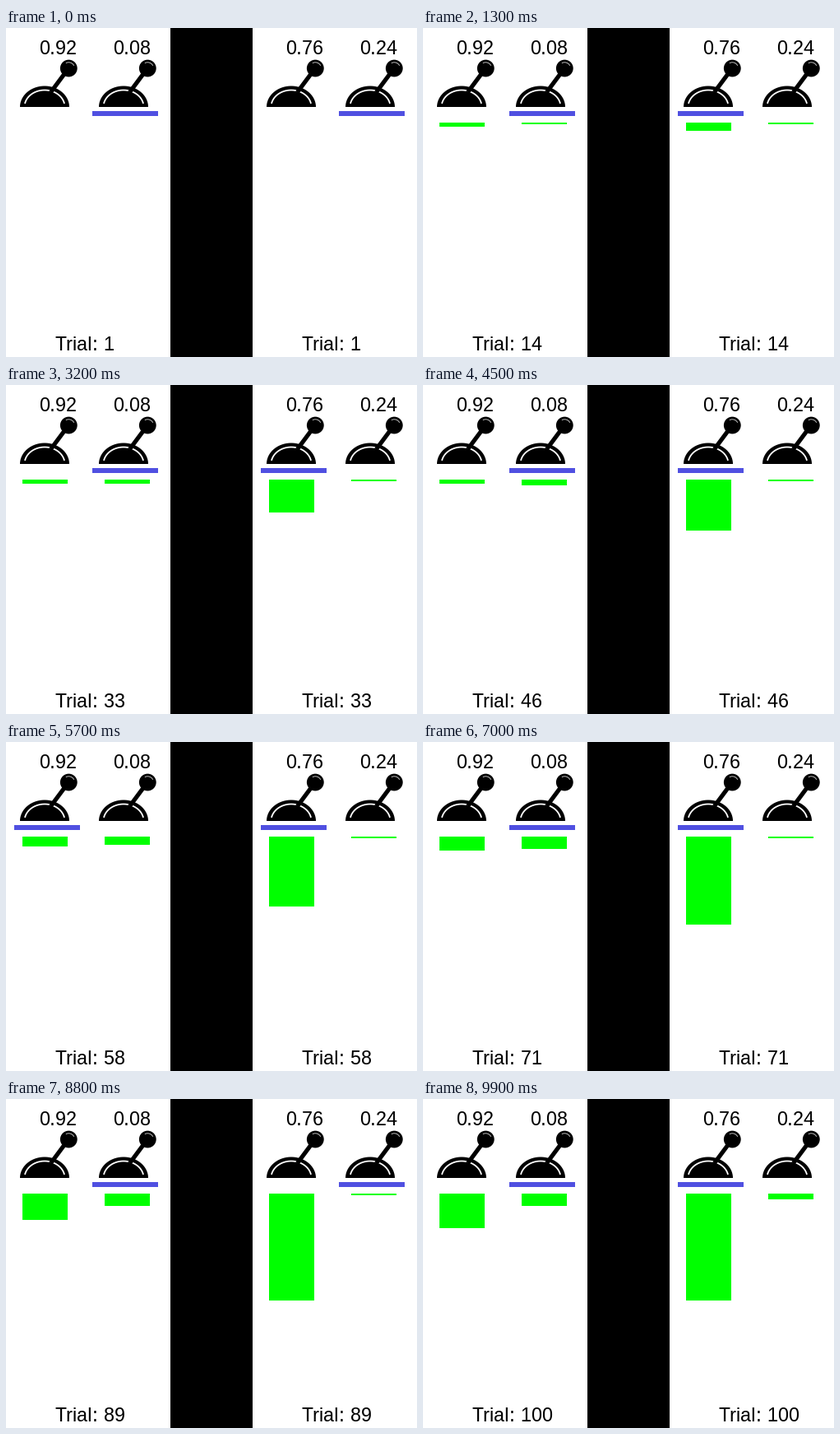
Recreate the animation shown at these times as a matplotlib script. Size 500 px wide and 400 px high, loop 10 s.

```python
import numpy as np
import matplotlib.pyplot as plt
from matplotlib.animation import FuncAnimation
from matplotlib.patches import Circle, Polygon, Rectangle

W, H, DPI = 500, 400, 100
TRIALS = 100
PX = 72 / DPI
BLUE, GREEN = "#5050e1", "#00ff00"
BAR_TOP, WIN_HEIGHT = 115, 2.5

plt.rcParams.update({
    "font.family": "Liberation Sans",
    "font.size": 17.28125,  # 24 px
    "text.hinting": "default",
    "text.hinting_factor": 1,
    "toolbar": "None",
})

fig = plt.figure(figsize=(W / DPI, H / DPI), dpi=DPI, facecolor="white")
ax = fig.add_axes([0, 0, 1, 1])
ax.set_xlim(0, W)
ax.set_ylim(H, 0)
ax.axis("off")


def rect(x, y, w, h, color):
    return ax.add_patch(Rectangle((x, y), w, h, fc=color, lw=0, antialiased=False))


def label(x, baseline, text):
    return ax.text(x, baseline, text, color="black", ha="left", va="baseline")


def arc(cx, cy, rx, ry, start, stop):
    t = np.radians(np.linspace(start, stop, 60))
    return cx + rx * np.cos(t), cy - ry * np.sin(t)


def lever(x):
    dome = np.column_stack(arc(x + 47, 96, 30, 25.5, 0, 180))
    ax.add_patch(Polygon(dome, fc="black", lw=0))
    ax.plot(*arc(x + 47, 96, 24.5, 20.5, 14, 166), color="white", lw=1.8 * PX)
    ax.plot([x + 56, x + 72], [76, 54.5], color="black", lw=5.2 * PX)
    ax.add_patch(Circle((x + 76.3, 49), 10.4, fc="black", lw=0))
    ax.plot(*arc(x + 76.3, 49, 7.2, 7.2, 30, 115), color="0.8", lw=0.9 * PX)


class Bandit:
    """Two levers, with the trials that pull the left one and those that pay."""

    def __init__(self, x, odds, left, wins):
        self.x = x
        self.left = left
        self.paid = [sorted(wins & left), sorted(wins - left)]
        for i, p in enumerate(odds):
            lever(x + 96 * i)
            label(x + 40 + 90 * i, 32, f"{p:.2f}")
        self.bars = [rect(x + 20 + 100 * i, BAR_TOP, 55, 0, GREEN) for i in (0, 1)]
        self.mark = rect(x + 105, 101, 80, 6, BLUE)
        self.count = label(x + 60, 392, "")

    def show(self, trial):
        for bar, paid in zip(self.bars, self.paid):
            wins = sum(t <= trial for t in paid)
            bar.set_height(int(wins * WIN_HEIGHT))
            bar.set_visible(wins > 0)
        self.mark.set_x(self.x + (10 if trial in self.left else 105))
        self.count.set_text(f"Trial: {trial}")


rect(200, 0, 100, H, "black")

left_a = {3, 4, 50, 54, 58, 63, 66, 73, 76, 78, 82, 85, 87, 91, 94, 96, 98}
wins_a = left_a | {8, 28, 40, 53, 61, 69}

left_b = set(range(10, 84)) - {26, 30, 81} | {100}
misses_b = {11, 17, 20, 23, 28, 32, 36, 39, 43, 45, 48, 52,
            55, 59, 62, 66, 70, 75, 80, 100}
wins_b = (left_b - misses_b) | {7, 93, 97}

bandits = [
    Bandit(0, (0.92, 0.08), left_a, wins_a),
    Bandit(300, (0.76, 0.24), left_b, wins_b),
]


def update(frame):
    for b in bandits:
        b.show(frame + 1)
    return []


anim = FuncAnimation(fig, update, frames=TRIALS, interval=100,
                     repeat=True, repeat_delay=0, blit=False)
plt.show()
```
